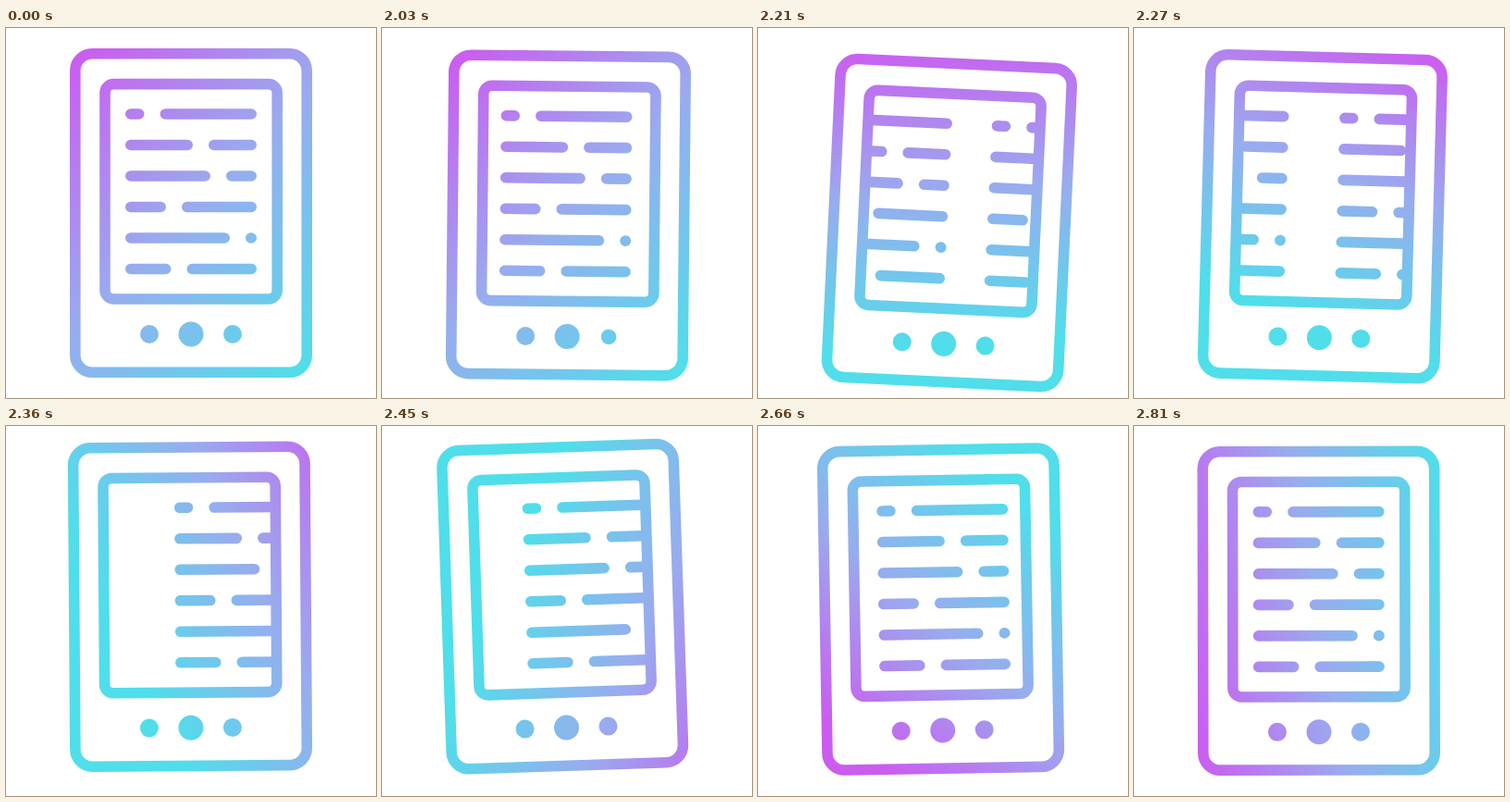
An HTML page with a canvas for the animation above (2.84 s loop, 400 px wide and 400 px high).

```html
<!DOCTYPE html>
<html lang="en">
<head>
<meta charset="utf-8">
<title>E-reader page turn</title>
<style>
  html, body { margin: 0; width: 100%; height: 100%; overflow: hidden; background: #fff; }
  canvas { display: block; width: 400px; height: 400px; }
</style>
</head>
<body>
<canvas id="stage" width="400" height="400"></canvas>
<script>
const ctx = document.getElementById('stage').getContext('2d');
const LOOP = 2840, HOLD = 2030, STEP = 30, STEPS = 28;
const LINE = 11.6, LEFT = 129, RIGHT = 271, GAP = 17;
const PIVOT = { x: 200, y: 345 };
const rad = deg => deg * Math.PI / 180;
const smooth = u => u * u * (3 - 2 * u);
const soft = u => (u + smooth(u)) / 2;

// Where the first dash of each row ends; the second starts after a gap
const rowBreaks = [149.5, 202, 221, 173, 242, 178.5];

// Swing from rest to a peak, over to a dip and back to rest
function swing(k, peakAt, peak, dipAt, dip) {
  if (k < peakAt) return peak * soft(k / peakAt);
  if (k < dipAt) return peak + (dip - peak) * soft((k - peakAt) / (dipAt - peakAt));
  return dip * (1 - soft((k - dipAt) / (STEPS - dipAt)));
}

function pose(k) {
  const p = k / STEPS;
  return {
    tilt: swing(k, 4.8, 3.6, 15.5, -2.05),
    drop: swing(k, 4.8, 15.5, 12.5, -5.6),
    oldX: -3 * k ** 1.64,
    newX: 216 * (1 - p ** 1.15) ** 2.9,
    button: k < 6 ? 10 - 3.4 * Math.sin(Math.PI * k / 6) : 10,
    angle: 45 + 306 * smooth(p ** 1.07),
    reach: 209 - 50 * smooth(Math.min(1, 3 * p)),
    shift: -88 * Math.sin(Math.PI * p) ** 4
  };
}

function frame(x0, y0, x1, y1, r) {
  ctx.beginPath();
  ctx.roundRect(x0, y0, x1 - x0, y1 - y0, r);
  ctx.stroke();
}

function dot(x, r) {
  ctx.beginPath();
  ctx.arc(x, 331, r, 0, 2 * Math.PI);
  ctx.fill();
}

function dash(x0, x1, y) {
  ctx.beginPath();
  ctx.roundRect(x0, y - LINE / 2, x1 - x0, LINE, LINE / 2);
  ctx.fill();
}

function page(dx) {
  rowBreaks.forEach((end, i) => {
    const y = 93 + i * 33.5;
    dash(LEFT + dx, end + dx, y);
    dash(end + GAP + dx, RIGHT + dx, y);
  });
}

function device(s) {
  ctx.save();
  ctx.translate(PIVOT.x, PIVOT.y + s.drop);
  ctx.rotate(rad(s.tilt));
  ctx.translate(-PIVOT.x, -PIVOT.y);
  ctx.fillStyle = ctx.strokeStyle = '#000';
  ctx.lineWidth = LINE;
  frame(74.8, 27.8, 325.2, 372.2, 18.5);
  frame(107, 60.6, 293.2, 293, 9.5);
  dot(155, 10);
  dot(200, 13.5);
  dot(245, s.button);
  ctx.beginPath();
  ctx.rect(107, 61, 186, 232);
  ctx.clip();
  page(s.oldX);
  page(s.newX);
  ctx.restore();
}

// Colour everything already drawn
function tint(s) {
  const dx = Math.cos(rad(s.angle)), dy = Math.sin(rad(s.angle));
  const from = s.shift - s.reach, to = s.shift + s.reach;
  const g = ctx.createLinearGradient(
    200 + dx * from, 200 + dy * from, 200 + dx * to, 200 + dy * to);
  g.addColorStop(0, '#cb5cf0');
  g.addColorStop(.5, '#98acee');
  g.addColorStop(1, '#50deea');
  ctx.globalCompositeOperation = 'source-in';
  ctx.fillStyle = g;
  ctx.fillRect(0, 0, 400, 400);
  ctx.globalCompositeOperation = 'source-over';
}

function draw(now) {
  const t = now % LOOP;
  const k = t < HOLD ? 0 : Math.floor((t - HOLD) / STEP) + 1;
  const s = pose(k);
  ctx.clearRect(0, 0, 400, 400);
  device(s);
  tint(s);
}

const begin = performance.now();
function tick() {
  draw(performance.now() - begin);
  requestAnimationFrame(tick);
}
tick();
</script>
</body>
</html>
```
